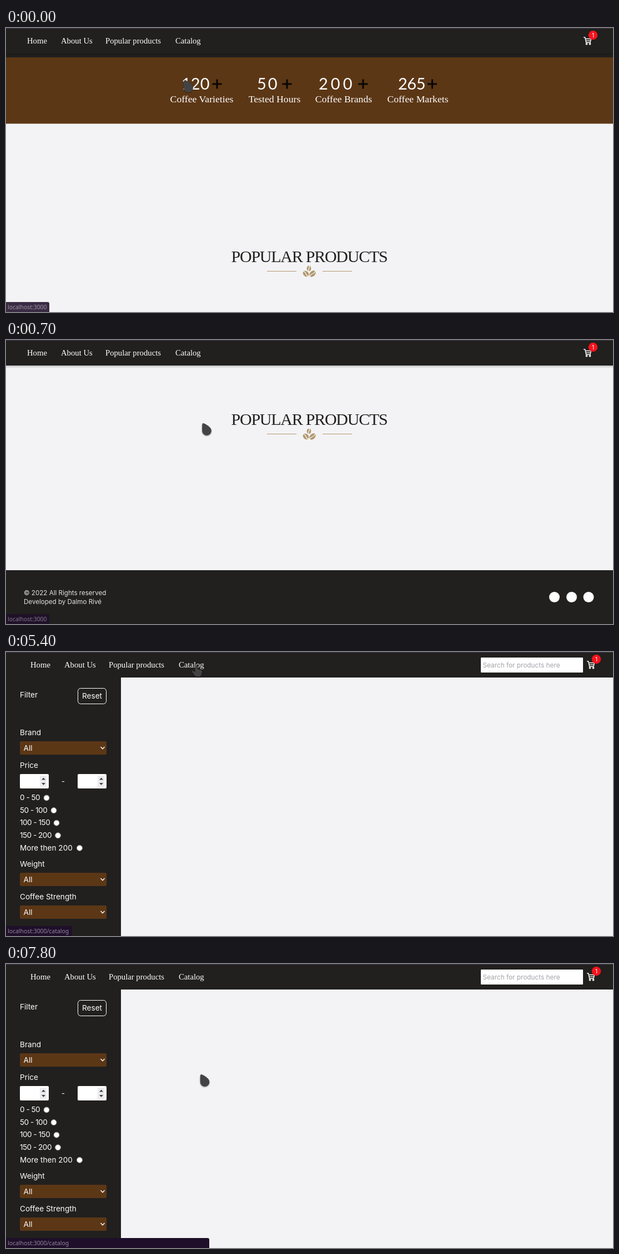
An HTML page that plays this animation: 1093 by 512 pixels, repeating every 8000 ms.

```html
<!DOCTYPE html>
<html lang="en">
<head>
<meta charset="utf-8">
<title>Coffee shop</title>
<style>
  html, body { margin: 0; width: 100%; height: 100%; overflow: hidden; background: #f3f3f5; }
  svg { display: block; width: 1093px; height: 512px; }
  text { fill: #fff; font: 13.6px Inter, sans-serif; white-space: pre; }
  .mid { text-anchor: middle; }
  .serif { font: 14.7px "Liberation Serif", serif; }
  .label { font-size: 17.7px; }
  .title { font-size: 30px; letter-spacing: -1.25px; fill: #21201e; }
  .count { font: 29px Lato, sans-serif; }
  .range { letter-spacing: -.5px; }
  .small { font-size: 11.6px; fill: #e4e4e4; }
  .hint { font-size: 11.8px; fill: #a3a3a9; }
  .url { font: 10.4px "Noto Sans", sans-serif; fill: #93899c; }
  .badge { font-size: 10px; }
  .dark { fill: #21201e; }
  .brown { fill: #5c3716; }
  .line { fill: none; stroke: #fff; stroke-width: 1.4; }
  #pointer { fill: #434345; filter: drop-shadow(0 1px 1px #0006); }
</style>
</head>
<body>
<svg viewBox="0 0 1093 512">
  <defs>
    <linearGradient id="shade" x2="0" y2="1">
      <stop stop-opacity=".2"/><stop offset="1" stop-opacity="0"/>
    </linearGradient>
  </defs>
  <rect width="1093" height="512" fill="#f3f3f5"/>
  <g id="home"></g>
  <rect id="shadow" y="46" width="1093" height="5" fill="url(#shade)"/>
  <g id="catalog"></g>
  <rect class="dark" width="1093" height="46"/>
  <rect width="1093" height="1" fill="#413452"/>
  <g id="nav"></g>
  <g id="status">
    <rect id="bubble" x="-4" y="494" height="24" rx="3" fill="#1f0f2a"/>
    <text id="url" class="url" x="3" y="507"></text>
  </g>
  <path id="pointer"/>
</svg>
<script>
const $ = id => document.getElementById(id);
const text = (x, y, s, cls = '') => `<text x="${x}" y="${y}" class="${cls}">${s}</text>`;
const rect = (x, y, w, h, attrs) => `<rect x="${x}" y="${y}" width="${w}" height="${h}" ${attrs}/>`;
const circle = (x, y, r, attrs) => `<circle cx="${x}" cy="${y}" r="${r}" ${attrs}/>`;
const path = (d, attrs) => `<path d="${d}" ${attrs}/>`;

const stat = ([mid, x, num, gap, plus, label]) =>
  `<text x="${x}" y="111" class="count" style="letter-spacing:${gap}px">${num}</text>` +
  path(`M${plus - 8.5} 101h17m-8.5-8.5v17`, 'stroke="#080604" stroke-width="3"') +
  text(mid, 134, label, 'serif label mid');

const bean = (x, y, angle, rx, ry) =>
  `<g transform="translate(${x} ${y}) rotate(${angle})">
    <ellipse rx="${rx}" ry="${ry}" fill="#b0966a"/>
    <path d="M0 ${-ry}Q1.8 ${-ry / 2} 0 0T0 ${ry}" fill="none" stroke="#f3f3f5" stroke-width="1.3"/>
  </g>`;

$('home').innerHTML =
  rect(0, 0, 1093, 53, 'class="dark"') + rect(0, 53, 1093, 119.5, 'class="brown"') +
  [[352.5, 316, 120, 0, 380, 'Coffee Varieties'], [483.5, 452, 50, 3, 506, 'Tested Hours'],
   [608, 563, 200, 5, 643, 'Coffee Brands'], [741.5, 706, 265, -.5, 767.5, 'Coffee Markets']].map(stat).join('') +
  text(546, 422, 'POPULAR PRODUCTS', 'serif title mid') +
  path('M470 438.5h53m47 0h53', 'stroke="#b3996c"') +
  bean(545.5, 433.5, 0, 3.8, 5) + bean(540, 443, -45, 4.6, 6) + bean(552, 443, 45, 4.6, 6.6) +
  rect(0, 684, 1093, 100, 'class="dark"') +
  text(32, 728.5, '© 2022 All Rights reserved', 'small') +
  text(32, 744.5, 'Developed by Dalmo Rivé', 'small') +
  [987.5, 1018.5, 1049].map(x => circle(x, 732.5, 9.5, 'fill="#fff"')).join('');

$('nav').innerHTML =
  [[38, 'Home'], [99, 'About Us'], [179, 'Popular products'], [305, 'Catalog']]
    .map(([x, s]) => text(x, 28, s, 'serif')).join('') +
  path('M1040 16.7h2.6l2 9.3h7.4l1.6-6.5h-10.4m.8 3.4h9', 'class="line"') +
  circle(1045.5, 28.7, 1.2, 'class="line"') + circle(1051.5, 28.7, 1.2, 'class="line"') +
  circle(1057, 13, 8.2, 'fill="#f5131d"') + text(1057, 16.5, '1', 'badge mid');

const select = y => rect(25, y, 156, 24, 'class="brown" rx="2"') + text(31.5, y + 17, 'All') +
  path(`M170.5 ${y + 10}l3.5 3.8 3.5-3.8`, 'class="line" stroke-width="1.8"');
const numberBox = x => rect(x, 220, 52, 26, 'fill="#fff" rx="2"') + rect(x + 36, 223, 12, 20, 'fill="#ececee"') +
  path(`M${x + 39} 230.5l3.5-4 3.5 4zm0 5.5l3.5 4 3.5-4z`, 'fill="#444"');
const radio = ([x, s], i) => text(25, 266.8 + 22.7 * i, s, i < 4 ? 'range' : '') +
  circle(x, 263 + 22.6 * i, 5, 'fill="#fff" stroke="#8a8a8a"');

$('catalog').innerHTML =
  rect(0, 46, 207, 466, 'class="dark"') +
  text(25, 82, 'Filter') +
  rect(129.5, 65.5, 51, 28, 'class="line" rx="5" style="stroke-width:1"') + text(155, 84, 'Reset', 'mid') +
  text(25, 149.5, 'Brand') + select(161) +
  text(25, 208.5, 'Price') + numberBox(25) + text(103, 238, '-', 'mid') + numberBox(129) +
  [[73, '0 - 50'], [86, '50 - 100'], [91, '100 - 150'], [93.5, '150 - 200'], [132.5, 'More then 200']].map(radio).join('') +
  text(25, 387, 'Weight') + select(398) +
  text(25, 446, 'Coffee Strength') + select(457);

const search = document.createElementNS('http://www.w3.org/2000/svg', 'g');
search.innerHTML = rect(855, 10, 184, 27, 'fill="#fff" rx="1"') + text(858.5, 28, 'Search for products here', 'hint');
$('nav').after(search);

const DROP = 'M2 0Q8 1.5 14 7.5A8.3 8.3 0 1 1 .2 13.5Q0 5 .5 1.5 .8 0 2 0Z';
const HAND = 'M6 2Q6 0 8 0T10 2V7L16 9Q19 10 18.5 13L17 18Q16 21 13 21H9Q7 21 5.5 19L.5 12.5Q0 10 2.5 10.5L6 13Z';

// [time, value...]: each row holds until the next
const scrollSteps = [[0, 0], [100, 100], [500, 226], [600, 256], [700, 269]];
const statusSteps = [[0, 78], [1700, 119], [7700, 250], [7800, 366]];
const pointerSteps = [[0, 320, 94], [100, 337, 124], [500, 353, 150], [1700, 335, 23], [1800, 334.5, 23.5],
  [6100, 355, 53.5], [6400, 375.5, 91], [6700, 380, 108], [7200, 384, 130], [7500, 371, 164],
  [7700, 360, 182], [7800, 349.5, 199]];
const at = (steps, t) => steps.findLast(step => step[0] <= t).slice(1);

function pointerAt(t) {
  if (t < 900 || t >= 1700) return at(pointerSteps, t);
  const p = (t - 800) / 800, q = 1 - p;
  return [353 * q * q + 2 * 383 * p * q + 349 * p * p, 150 - 130 * p];
}

function draw() {
  const t = Math.floor(performance.now() % 8000 / 100) * 100;
  const onCatalog = t >= 5400;
  const show = (el, on) => el.setAttribute('display', on ? 'inline' : 'none');
  show($('home'), !onCatalog);
  show($('shadow'), !onCatalog);
  show($('catalog'), onCatalog);
  show(search, onCatalog);
  $('home').setAttribute('transform', `translate(0 ${-at(scrollSteps, t)[0]})`);
  $('nav').setAttribute('transform', `translate(${onCatalog ? 6 : 0} 0)`);
  $('bubble').setAttribute('width', at(statusSteps, t)[0] + 4);
  $('status').setAttribute('opacity', t < 900 ? .87 : 1);
  $('url').textContent = 'localhost:3000' + (t < 1700 ? '' : '/catalog');
  $('pointer').setAttribute('d', t >= 1800 && t < 7700 ? HAND : DROP);
  $('pointer').setAttribute('transform', `translate(${pointerAt(t)})`);
  requestAnimationFrame(draw);
}
draw();
</script>
</body>
</html>
```
